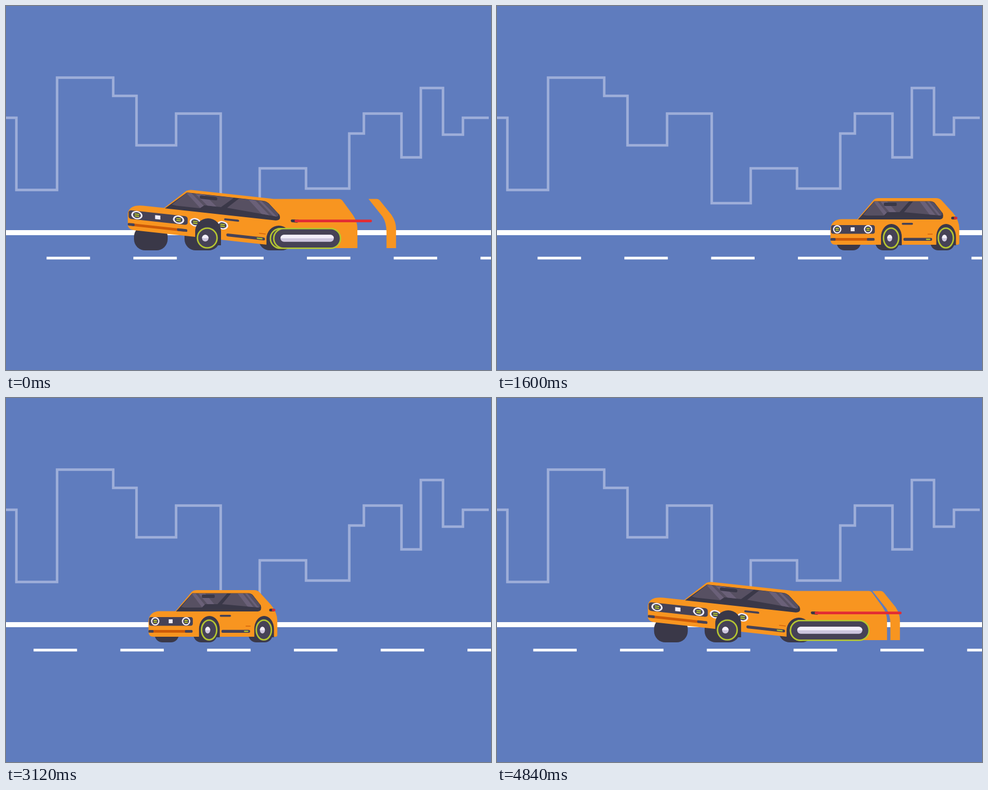
These frames come from a looping animation (864x648 px, 4.88 s). An HTML page with a canvas:

```html
<!DOCTYPE html>
<html lang="en">
<head>
<meta charset="utf-8">
<title>Speeding car</title>
<style>
html, body { margin: 0; width: 100%; height: 100%; overflow: hidden; background: #5f7cbe; }
canvas { display: block; }
</style>
</head>
<body>
<canvas id="stage" width="864" height="648"></canvas>
<script>
const ctx = document.getElementById('stage').getContext('2d');
const STEP = 40, CYCLE = 61;
const ORANGE = '#f89520', RUST = '#cc5a08', DARK = '#3a3848', SLATE = '#464256',
  GLASS = '#575062', GLARE = '#6a6078', LIME = '#b5c72f', PALE = '#f3effa', LILAC = '#cdc6de', RED = '#e32c33';

const skyline = new Path2D('M0 199H18.5V327.5H91V127.5H191V160H232.5V248H303V191.5H382.5V351H452V289H534.5' +
  'V325H611.5V227H637.5V191.5H704.5V269.5H739V146H778.5V229H814V199H860');
const shell = new Path2D('M0 396Q2 380 20 379.5H48L77 345Q80 342 86 342H188Q194 342 198 346L218 368' +
  'Q229 381 229.5 396V422Q229.5 425 226 425H9Q0 425 0 416Z');
const windows = new Path2D('M49 380L78 347.5H178Q183 347.5 186 351L200 369Q203 379 195 380Z');
const panes = new Path2D('M78 348H140L123 367H101L95 373H64L58 372ZM147 348H178Q183 348 186 352L198 367Q200 373 196 373L131 367Z');
const glare = new Path2D('M77 348H84L110 380H101ZM89 348H101L128 380H116ZM159 348H168L193 380H183ZM172 348H176L199 376L197 379Z');

// Rear smear lengths for steps 57 to 63 of the cycle
const TAIL = [25, 60, 92, 131, 114, 75, 35];
const TRAIL = [20, 60, 101, 106, 91, 55, 20];

const clamp = v => Math.max(0, Math.min(1, v));
const smooth = v => (v = clamp(v), v * v * (3 - 2 * v));
const at = (list, n) => list[n - 57] || 0;

function carX(n) {
  if (n > 67) n -= CYCLE;
  if (n < 41.5) return 158 + 219 * (1 - Math.cos(Math.PI * (n - 6) / 35.5));
  if (n < 59) return 596 - 198 * clamp((n - 49.7) / 9.3) ** 3;
  return 158 + 125 * ((67 - n) / 6) ** 2.25;
}

function fill(color, path) {
  ctx.fillStyle = color;
  ctx.fill(path);
}
function box(color, x, y, w, h, r = h / 2) {
  const p = new Path2D();
  p.roundRect(x, y, w, h, r);
  fill(color, p);
}
function oval(color, x, y, rx, ry = rx) {
  const p = new Path2D();
  p.ellipse(x, y, rx, ry, 0, 0, 7);
  fill(color, p);
}
function ring(x, y, w, h) {
  ctx.beginPath();
  ctx.roundRect(x, y, w, h, Math.min(w, h) / 2);
  ctx.fillStyle = SLATE;
  ctx.fill();
  ctx.strokeStyle = LIME;
  ctx.lineWidth = 2.6;
  ctx.stroke();
}

function headlight(x, y) {
  oval(PALE, x, y, 7.5);
  oval(SLATE, x, y, 5.2);
  box(LIME, x - 3.2, y - 2.6, 6.4, 2);
  box(LIME, x - 3.2, y + 0.8, 6.4, 2);
}

function arch(x, top, rx, ry) {
  const p = new Path2D();
  p.ellipse(x, top + ry, rx, ry, 0, Math.PI, 0);
  p.lineTo(x + rx, 426);
  p.lineTo(x - rx, 426);
  fill(DARK, p);
}

function wheel(x, rx, hub) {
  oval(SLATE, x, 413, rx + 1.5, 20);
  ctx.beginPath();
  ctx.ellipse(x, 413, rx, 17.5, 0, 0, 7);
  ctx.strokeStyle = LIME;
  ctx.lineWidth = 2.6;
  ctx.stroke();
  oval(LILAC, hub, 413.3, rx * 0.33, 6);
  const cap = new Path2D();
  cap.ellipse(hub, 413.3, rx * 0.33, 6, 0, Math.PI, 0);
  fill(PALE, cap);
}

function tail(x, edge) {
  fill(ORANGE, new Path2D(`M${x + 185} 343.5H${edge - 32}Q${edge - 29} 343.5 ${edge - 27} 346` +
    `L${edge - 8} 372Q${edge} 384 ${edge} 396V431H${x + 207}Z`));
}
function strip(edge) {
  fill(ORANGE, new Path2D(`M${edge - 49} 343.5H${edge - 34}Q${edge - 31} 343.5 ${edge - 29} 346` +
    `L${edge - 8} 372Q${edge} 384 ${edge} 396V431H${edge - 17}V402Q${edge - 17} 386 ${edge - 24} 375Z`));
}

function bodywork(smeared) {
  fill(ORANGE, shell);
  fill(DARK, windows);
  fill(GLASS, panes);
  ctx.save();
  ctx.clip(panes);
  fill(GLARE, glare);
  ctx.restore();
  box(DARK, 95, 350, 23, 6, 2);
  box(SLATE, 1, 390, 78, 15.5, 4);
  headlight(12, 397.5);
  headlight(67, 397.5);
  box(PALE, 36, 394, 7, 7, 0);
  box(RUST, 5, 413, 70, 4.8, 1);
  box(SLATE, 0, 413, 9, 4.8, 1.5);
  box(SLATE, 65, 413, 13.5, 4.8, 1.5);
  box(SLATE, 127, 386, 20, 3.6);
  box(SLATE, 130, 412.7, 51, 5.2, 2);
  box(LIME, 170, 414.2, 8, 2.2);
  box(RUST, 173, 405.5, 9, 1.3);
  box(DARK, 215, 375, 10, 5, 2.5);
  if (smeared) [89, 109, 125].forEach(x => headlight(x, 399));
  else box(RED, 220, 375.5, 6, 4, 1);
}

function car(n) {
  const x = carX(n);
  const stretch = n < 60 ? smooth((n - 54.5) / 4.5) : 1 - smooth((n - 61) / 4);
  const tilt = n < 60 ? smooth((n - 54) / 5) : 1 - clamp((n - 61) / 11);
  const mix = (a, b) => a + (b - a) * stretch;
  const smear = at(TAIL, n), edge = x + 229 + smear;

  const tyre = (l, r, l2, r2) => {
    const left = mix(l, l2), top = mix(405, 391);
    box(DARK, x + left, top, mix(r, r2) - left, 435 - top, mix(14, 20));
  };
  tyre(11, 54, -55, 5);
  tyre(80, 122, 35, 98);
  tyre(178, 221, 167, 228);

  if (smear) {
    tail(x, edge);
    if (n > 59) strip(carX(n - 1) + 229 + at(TAIL, n - 1));
  }

  ctx.save();
  ctx.transform(mix(1, 1.35), 0.147 * tilt, 0, 1, x - 66 * stretch, -27 * tilt);
  bodywork(smear > 0);
  ctx.restore();

  arch(x + mix(108.5, 77), mix(388, 378), mix(18.5, 23), 23);
  wheel(x + mix(108, 75.5), mix(13.5, 17.5), x + mix(105.5, 72));
  arch(x + mix(206, 203), mix(388, 391), mix(17.5, 22), 23);
  if (!smear) {
    wheel(x + 205.5, mix(13.5, 17.5), x + 203);
    return;
  }

  const left = x + 188, shift = n % 2 * 6, width = 34 + at(TRAIL, n) - shift;
  ring(left, 396.3, 35, 35);
  ring(left + shift, 396.3, width, 35);
  box(LILAC, left + shift + 12, 407.3, width - 24, 12.4);
  ctx.save();
  ctx.beginPath();
  ctx.rect(left, 407, width + 6, 6.6);
  ctx.clip();
  box(PALE, left + shift + 12, 407.3, width - 24, 12.4);
  ctx.restore();
  box(DARK, x + 225, 380.3, 14, 4.8, 2);
  box(RED, x + 231, 380.3, smear + 24, 4.8);
}

function draw(time) {
  const frame = Math.floor((time + 1) / STEP) % CYCLE;
  const n = frame < 20 ? frame + CYCLE : frame;
  ctx.fillStyle = '#5f7cbe';
  ctx.fillRect(0, 0, 864, 648);
  ctx.strokeStyle = '#9eaed9';
  ctx.lineWidth = 4.5;
  ctx.stroke(skyline);
  ctx.fillStyle = '#fff';
  ctx.fillRect(0, 399, 864, 9);
  const gap = 154.6, roll = (72.3 + (frame - (frame > 50)) * gap / 20) % gap;
  for (let x = roll - gap; x < 864; x += gap) ctx.fillRect(x, 446.4, 77.4, 4.8);
  car(n);
  requestAnimationFrame(draw);
}
requestAnimationFrame(draw);
</script>
</body>
</html>
```
